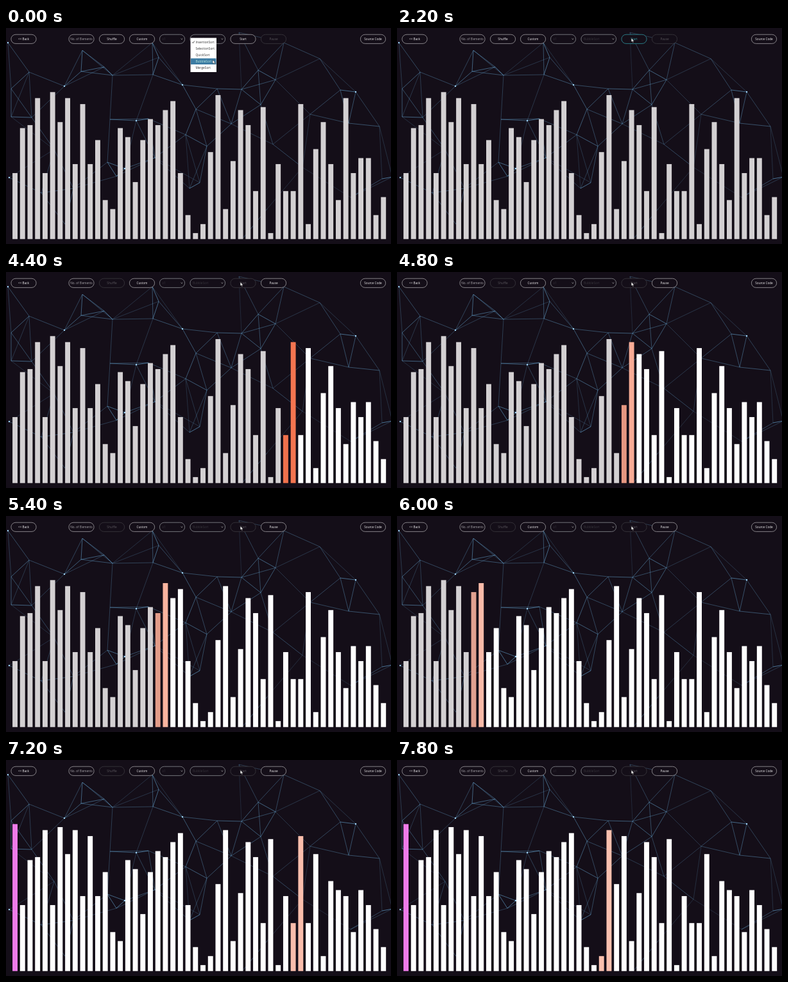
Recreate the animation shown at these times as an HTML page. Size 600 px wide and 338 px high, loop 8000 ms.

```html
<!DOCTYPE html>
<html lang="en">
<head>
<meta charset="utf-8">
<title>Sorting visualizer</title>
<style>
  html, body { margin: 0; height: 100%; overflow: hidden; background: #140e18; }
  svg { display: block; width: 100vw; height: 100vh; }
  text { font: 4.7px "Open Sans", "Noto Sans", sans-serif; fill: #f4f2f4; }
  .button rect { fill: #140e18; stroke: #a19fa3; stroke-width: .8; }
  .button text { text-anchor: middle; }
  .button.soft text { fill: #aaa7ac; }
  .button.select text { fill: #38353c; text-anchor: start; }
  .button.select rect { stroke: #8b8d92; }
  .button.off rect { stroke: #3c393f; }
  .button.off text { fill: #5a575d; }
  .chevron { fill: none; stroke: #bbb; stroke-width: .7; }
  #web line { stroke: #6cb0de; stroke-width: .9; }
  #web circle { fill: #a5dcff; }
  #menu text { fill: #333; font-size: 4.8px; }
  #menu .chosen { fill: #b5e4dc; }
</style>
</head>
<body>
<svg viewBox="0 0 600 338">
  <rect width="600" height="338" fill="#140e18"/>
  <g id="web"></g>
  <g id="bars"></g>
  <g id="buttons"></g>
  <g id="menu">
    <rect x="287.5" y="15.5" width="40.5" height="53.5" fill="#fff"/>
    <rect x="288" y="47.5" width="39.5" height="9.5" fill="#3c7ca3"/>
    <path d="M290.3 22.2l1.2 1.4 2.2-3.2" fill="none" stroke="#222" stroke-width=".8"/>
  </g>
  <path id="cursor" d="M0 0v5.8l1.4-1.2 1 2.1 1-.5-1-2h1.9z" fill="#fff" stroke="#111" stroke-width=".4"/>
</svg>
<script>
const LOOP = 8000, MENU_CLOSE = 600, SORT_START = 3622;
const FIRST_PASS_STEP = 60.3, LATER_STEP = 54.6;
const byId = id => document.getElementById(id);
const clamp = x => Math.max(0, Math.min(1, x));
const ease = x => x * x * (3 - 2 * x);
const mix = (a, b, p) => `rgb(${a.map((v, i) => Math.round(v + (b[i] - v) * p))})`;

function add(parent, tag, attrs, text) {
  const el = document.createElementNS("http://www.w3.org/2000/svg", tag);
  for (const key in attrs) el.setAttribute(key, attrs[key]);
  if (text) el.textContent = text;
  return parent.appendChild(el);
}

// Particle web: each node is tied to its nearest neighbours, closer ones brighter.
function drawWeb() {
  const REACH = 92, TIES = 4, web = byId("web");
  const glowing = [[3, 23], [91, 91], [275, 89], [545, 100], [203, 145], [185, 220], [5, 234]];
  const plain = [
    [36, 69], [8, 95], [8, 139], [40, 140], [117, 68], [119, 35], [153, 61], [166, 74],
    [228, 23], [238, 46], [229, 73], [162, 143], [222, 142], [158, 210], [172, 232], [232, 203],
    [75, 190], [55, 258], [105, 251], [92, 307], [329, 95], [296, 127], [280, 167], [313, 185],
    [351, 150], [367, 96], [393, 66], [420, 81], [397, 120], [433, 23], [363, 7], [489, 48],
    [521, 97], [474, 135], [534, 149], [582, 154], [302, 242], [286, 251], [416, 182], [462, 218],
    [537, 265], [586, 236], [602, 233], [407, 283], [370, 328]
  ];
  const nodes = glowing.concat(plain), tied = new Set();
  const dist = (a, b) => Math.hypot(a[0] - b[0], a[1] - b[1]);
  for (const a of nodes) {
    const near = nodes.filter(b => b !== a && dist(a, b) < REACH)
      .sort((b, c) => dist(a, b) - dist(a, c)).slice(0, TIES);
    for (const b of near) {
      const key = [a, b].sort().join();
      if (tied.has(key)) continue;
      tied.add(key);
      add(web, "line", {
        x1: a[0], y1: a[1], x2: b[0], y2: b[1],
        "stroke-opacity": .8 * (1 - dist(a, b) / 115)
      });
    }
  }
  for (const [cx, cy] of glowing) add(web, "circle", { cx, cy, r: 1.2 });
}
drawWeb();

function button(label, x, width = 40, kind = "") {
  const g = add(byId("buttons"), "g", { class: "button " + kind });
  add(g, "rect", { x: x + .4, y: 10.2, width: width - .8, height: 14.2, rx: 7.1 });
  const select = kind === "select";
  add(g, "text", { x: select ? x + 4.5 : x + width / 2, y: 19 }, label);
  if (select) add(g, "path", { class: "chevron", d: `M${x + width - 6.5} 16.5l1.4 1.4 1.4-1.4` });
  return g;
}
button("<< Back", 7.5);
button("No. of Elements", 97.5, 40, "soft");
const shuffle = button("Shuffle", 145);
button("Custom", 192);
button("x1", 239, 40, "select");
button("BubbleSort", 286.5, 55.5, "select");
const start = button("Start", 349.5);
const pause = button("Pause", 397);
button("Source Code", 552);

["Insertion", "Selection", "Quick", "Bubble", "Merge"].forEach((name, i) =>
  add(byId("menu"), "text", { x: 295.5, y: 23.8 + i * 10, class: i === 3 ? "chosen" : "" }, name + "Sort"));

// The shuffled values to be sorted.
const initial = [
  22, 37, 38, 47, 22, 49, 39, 47, 25, 45, 25, 33, 13, 10, 37, 34, 19, 33, 40, 38, 43, 46, 22, 8, 2,
  5, 29, 48, 10, 26, 43, 38, 16, 44, 2, 25, 16, 16, 45, 5, 30, 39, 25, 13, 47, 22, 27, 27, 8, 14
];
const UNIT = 230 / 49, LAST = initial.length - 1;
const GREY = [211, 208, 210], WHITE = [255, 255, 255], ORANGE = [243, 105, 64], PINK = [238, 123, 233];
const bars = initial.map((v, i) => add(byId("bars"), "rect", { x: 10.1 + i * 11.718, width: 7.9 }));

function stepsAt(t) {
  const steps = Math.max(0, t - SORT_START) / FIRST_PASS_STEP;
  return steps < LAST ? steps : LAST + (steps - LAST) * FIRST_PASS_STEP / LATER_STEP;
}

// Bubble sort from the right, replayed up to the given time.
function drawBars(t) {
  const values = initial.slice(), running = t >= SORT_START, steps = stepsAt(t);
  let pass = 0, j = LAST;
  for (let n = Math.floor(steps); n > 0; n--) {
    if (values[j - 1] < values[j]) [values[j - 1], values[j]] = [values[j], values[j - 1]];
    if (--j === pass) { pass++; j = LAST; }
  }
  bars.forEach((bar, i) => {
    const height = values[i] * UNIT;
    const base = i < pass ? PINK : pass || (running && i >= j) ? WHITE : GREY;
    const active = running && (i === j || i === j - 1);
    bar.setAttribute("y", 330.3 - height);
    bar.setAttribute("height", height);
    bar.setAttribute("fill", mix(base, ORANGE, active ? steps % 1 : 0));
  });
}

function draw(t) {
  const running = t >= SORT_START;
  drawBars(t);
  shuffle.classList.toggle("off", running);
  start.classList.toggle("off", running);
  pause.classList.toggle("off", !running);

  const hover = clamp((t - 1250) / 500), [edge, label] = start.children;
  edge.style.stroke = running ? "" : mix([161, 159, 163], [48, 148, 157], hover);
  label.style.fill = running ? "" : mix([244, 242, 244], [48, 160, 168], hover);

  byId("menu").style.display = t < MENU_CLOSE ? "" : "none";
  const move = ease(clamp((t - MENU_CLOSE) / 700));
  byId("cursor").setAttribute("transform", `translate(${322 + 43.2 * move} ${50 - 34 * move})`);
}

function tick() {
  draw(performance.now() % LOOP);
  requestAnimationFrame(tick);
}
tick();
</script>
</body>
</html>
```
